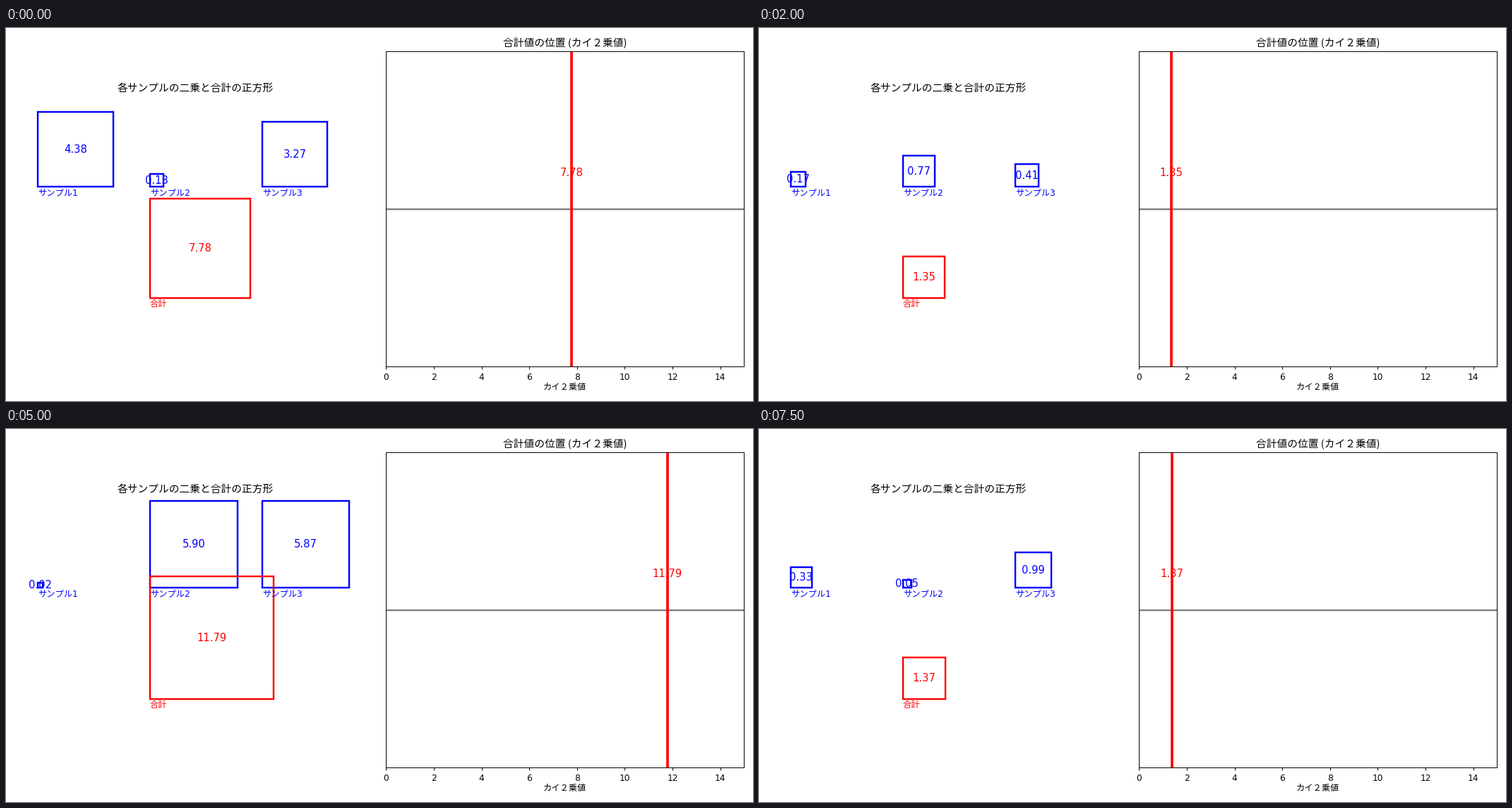
Write a matplotlib script that moves like this. It is 1058 px wide and 529 px high and loops after 8 s.

```python
import numpy as np
import matplotlib.pyplot as plt
from matplotlib.animation import FuncAnimation
from matplotlib.patches import Rectangle

W, H = 1058, 529
DPI = 88.16667          # a 12 x 6 inch figure
STEP = 500              # ms per draw of three samples
UNIT = 50.85            # pixels per unit of square side
LEFTS = (45.3, 204.2, 363.1)
SAMPLE_BASE, TOTAL_BASE = 225.4, 383.4

CJK = ["Noto Sans CJK JP"]
plt.rcParams["font.family"] = ["DejaVu Sans"] + CJK

# squared normal samples, one row per step
SQUARES = np.array([
    (4.38, 0.13, 3.27),
    (2.45, 3.80, 3.12),
    (0.697, 0.28, 0.003),
    (0.62, 0.94, 1.18),
    (0.17, 0.77, 0.41),
    (0.46, 0.21, 0.35),
    (0.52, 0.44, 0.39),
    (0.12, 0.68, 0.54),
    (0.03, 0.88, 0.38),
    (0.36, 0.25, 0.42),
    (0.02, 5.90, 5.87),
    (0.30, 1.26, 1.85),
    (0.95, 1.24, 1.44),
    (0.733, 2.132, 0.593),
    (0.58, 0.83, 0.97),
    (0.33, 0.05, 0.99),
])

fig = plt.figure(figsize=(12, 6), dpi=DPI, facecolor="white")

# left panel, in pixel coordinates with y pointing down
stage = fig.add_axes([0, 0, 1, 1])
stage.set(xlim=(0, W), ylim=(H, 0))
stage.axis("off")

# right panel
chart = fig.add_axes([538.4 / W, (H - 480.5) / H, 507 / W, 447 / H])
chart.set(xlim=(0, 15), ylim=(480.5, 33.5), yticks=[])
chart.axhline(257, color="gray", lw=2)
bar = chart.axvline(0, color="red", lw=3)
bar_text = chart.text(0, 205, "", color="red", fontsize=12,
                      ha="center", va="center")


def caption(x, y, text, size):
    stage.text(x, y, text, fontsize=size, family=CJK, ha="center")


caption(267.7, 90, "各サンプルの二乗と合計の正方形", 12)
caption(791.5, 25.6, "合計値の位置 (カイ２乗値)", 12)
caption(791.5, 513.3, "カイ２乗値", 10)


class Square:
    """A labelled square whose area shows a value."""

    def __init__(self, x, base, label, color):
        self.x, self.base = x, base
        self.box = Rectangle((x, base), 0, 0, fill=False, ec=color, lw=2)
        stage.add_patch(self.box)
        stage.text(x - 0.3, base + 12, label, color=color, fontsize=10)
        self.text = stage.text(x, base, "", color=color, fontsize=12,
                               ha="center", va="center")

    def show(self, value):
        side = UNIT * np.sqrt(value)
        self.box.set_bounds(self.x, self.base - side, side, side)
        self.text.set_position((self.x + side / 2, self.base - side / 2))
        self.text.set_text(f"{value:.2f}")


samples = [Square(x, SAMPLE_BASE, f"サンプル{i}", "blue")
           for i, x in enumerate(LEFTS, 1)]
total_square = Square(LEFTS[1], TOTAL_BASE, "合計", "red")


def draw(step):
    row = SQUARES[step]
    total = row.sum()
    for square, value in zip(samples, row):
        square.show(value)
    total_square.show(total)
    bar.set_xdata([total, total])
    bar_text.set_x(total)
    bar_text.set_text(f"{total:.2f}")
    return []


anim = FuncAnimation(fig, draw, frames=len(SQUARES), interval=STEP,
                     repeat=True, repeat_delay=0)
plt.show()
```
